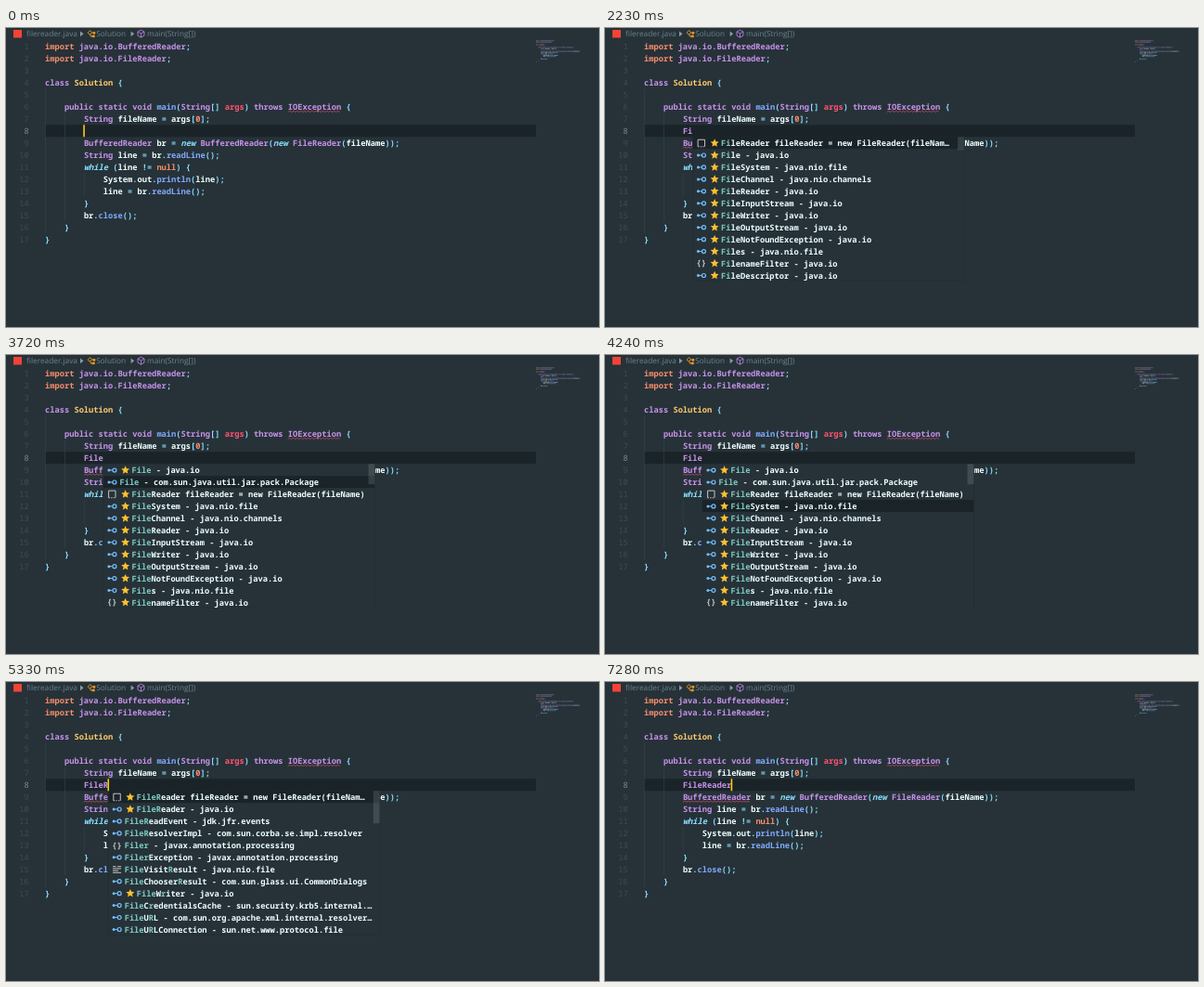
Animation of 639x322 px, one loop 7.51 s. Source, as an HTML page:

```html
<!DOCTYPE html>
<html lang="en">
<head>
<meta charset="utf-8">
<title>Code completion</title>
<style>
  html, body { margin: 0; width: 100%; height: 100%; overflow: hidden; background: #263238; }
  svg { display: block; }
  text {
    font: 600 8.725px "Noto Sans Mono", "DejaVu Sans Mono", monospace;
    white-space: pre;
    text-rendering: geometricPrecision;
  }
  text.crumb { font: 400 8.3px "Open Sans", "Noto Sans", sans-serif; fill: #6d838d; }
  text.num { font-weight: 400; text-anchor: end; }
  text.it { font-style: italic; }
</style>
</head>
<body>
<svg id="stage" width="639" height="322" viewBox="0 0 639 322"></svg>
<script>
const LOOP = 7510;
const CW = 5.235, LH = 12.95, LEFT = 42, TOP = 13.65, BASE = 9.8;
const MAP_X = 571, MAP_Y = 13.4, MAP_CW = 0.65, MAP_LH = 1.41;
const TYPED = 'FileReader';
const POP_W = 292.7;

const COLORS = {
  o: '#f78c6c', p: '#c792ea', c: '#89ddff', i: '#89ddff', y: '#ffcb6b',
  b: '#82aaff', r: '#ff5370', w: '#eeffff'
};

// "~" starts a token, the next letter is its colour
const CODE = [
  '~oimport ~pjava.io.BufferedReader~c;',
  '~oimport ~pjava.io.FileReader~c;',
  '',
  '~pclass ~ySolution ~c{',
  '',
  '~w    ~ppublic static void ~bmain~c(~pString~c[] ~rargs~c) ~pthrows IOException ~c{',
  '~w        ~pString ~wfileName ~c= ~wargs~c[~o0~c];',
  '',
  '~w        ~pBufferedReader ~wbr ~c= ~inew ~pBufferedReader~c(~inew ~pFileReader~c(~wfileName~c));',
  '~w        ~pString ~wline ~c= ~wbr~c.~breadLine~c();',
  '~w        ~iwhile ~c(~wline ~c!= ~onull~c) {',
  '~w            ~wSystem~c.~wout~c.~bprintln~c(~wline~c);',
  '~w            ~wline ~c= ~wbr~c.~breadLine~c();',
  '~w        ~c}',
  '~w        ~wbr~c.~bclose~c();',
  '~w    ~c}',
  '~c}'
];

// kind (s snippet, c class, n interface, e enum), "*" for a starred entry, label
const io = name => 'c*' + name + ' - java.io';
const CUT = 's*FileReader fileReader = new FileReader(fileNam…';
const FILTER = 'n*FilenameFilter - java.io';
const SYSTEM = 'c*FileSystem - java.nio.file';
const CHANNEL = 'c*FileChannel - java.nio.channels';
const COMMON = [
  ...['FileReader', 'FileInputStream', 'FileWriter', 'FileOutputStream', 'FileNotFoundException'].map(io),
  'c*Files - java.nio.file', FILTER
];
const LISTS = {
  first: [CUT, io('File'), io('FileDescriptor'), SYSTEM, ...COMMON, 'c*Float - java.lang'],
  stale: [CUT, io('File'), io('FileDescriptor'), SYSTEM, ...COMMON, CHANNEL],
  sorted: [CUT, io('File'), SYSTEM, CHANNEL, ...COMMON, io('FileDescriptor')],
  file: [io('File'), 'c File - com.sun.java.util.jar.pack.Package',
    's*FileReader fileReader = new FileReader(fileName)', SYSTEM, CHANNEL, ...COMMON],
  reader: [CUT, io('FileReader'), 'c FileReadEvent - jdk.jfr.events',
    'c FileResolverImpl - com.sun.corba.se.impl.resolver',
    'n Filer - javax.annotation.processing',
    'c FilerException - javax.annotation.processing',
    'e FileVisitResult - java.nio.file',
    'c FileChooserResult - com.sun.glass.ui.CommonDialogs',
    io('FileWriter'),
    'c FileCredentialsCache - sun.security.krb5.internal.…',
    'c FileURL - com.sun.org.apache.xml.internal.resolver…',
    'c FileURLConnection - sun.net.www.protocol.file']
};
const THUMB = { first: 14, stale: 14, sorted: 14, file: 22, reader: 35 };

// timelines: [start ms, value]
const CHARS = [[0, 0], [520, 1], [1610, 2], [2610, 3], [2770, 4], [5250, 5], [7280, 10]];
const LIST = [[0, ''], [1070, 'first'], [1690, 'stale'], [2000, 'sorted'], [2920, 'file'], [5330, 'reader'], [7280, '']];
const ANCHOR = [[0, 1], [1690, 2], [2610, 3], [2770, 4], [5330, 5]];
const ROW = [[0, 0], [3720, 1], [3860, 2], [4240, 3], [4410, 4], [4720, 3], [5100, 2], [5330, 0], [6030, 1]];
const CARET = [70, 520, 1140, 1610, 2230, 2610, 3240, 3770, 4240, 4790, 5800, 6350, 6820, 7280];
const ERROR_AT = 1460;

const at = (steps, t) => steps.filter(s => s[0] <= t).pop()[1];
const esc = s => s.replace(/&/g, '&amp;').replace(/</g, '&lt;');
const rect = (x, y, w, h, fill, extra = '') =>
  `<rect x="${x}" y="${y}" width="${w}" height="${h}" fill="${fill}" ${extra}/>`;
const text = (x, y, s, fill, cls = '') =>
  `<text x="${x}" y="${y}" fill="${fill}" class="${cls}">${esc(s)}</text>`;
const path = (d, stroke, w = 1, fill = 'none') =>
  `<path d="${d}" stroke="${stroke}" stroke-width="${w}" fill="${fill}"/>`;
const lineY = i => TOP + i * LH;
const colX = c => LEFT + c * CW;

function squiggle(line, col, len) {
  const y = lineY(line) + 11.5, end = colX(col + len);
  let d = `M${colX(col)} ${y + 0.6}`, up = true;
  for (let x = colX(col) + 2; x < end; x += 2, up = !up) d += `L${x} ${y + (up ? -0.6 : 0.6)}`;
  return path(d, '#d94b66', 0.7);
}

// one bar per word
function mapBars(line, col, s, fill) {
  return [...s.matchAll(/\S+/g)].map(m =>
    rect(MAP_X + (col + m.index) * MAP_CW, MAP_Y + line * MAP_LH, m[0].length * MAP_CW, 0.85, fill, 'opacity=".45"')
  ).join('');
}

function codeLine(src, i) {
  let col = 0, out = '';
  for (const part of src.split('~').slice(1)) {
    const kind = part[0], s = part.slice(1);
    if (s.trim()) {
      out += text(colX(col), lineY(i) + BASE, s, COLORS[kind], kind === 'i' ? 'it' : '');
      out += mapBars(i, col, s, COLORS[kind]);
    }
    col += s.length;
  }
  return out;
}

function lineNumber(_, i) {
  return text(24.8, lineY(i) + BASE, String(i + 1), i === 7 ? '#748c97' : '#3c4c54', 'num');
}

function guide(col, from, to) {
  return rect(colX(col), lineY(from), 0.7, (to - from + 1) * LH, '#37474f', 'opacity=".8"');
}

function breadcrumbs() {
  const arrow = x => path(`M${x} 3.4L${x + 3.6} 6.3L${x} 9.2Z`, 'none', 0, '#8a9ba3');
  return rect(8, 2, 9, 8.5, '#f44336') +
    text(22, 9.3, 'filereader.java', '', 'crumb') + arrow(80) +
    path('M88.2 5.2L90.6 2.6L92.6 4.6L90.2 7.2ZM92.4 5.2H95M91.2 6.6V9H93', '#ee9d28', 0.9) +
    path('M94 4.4h2v1.8h-2zM93 8h2.4v1.8h-2.4z', '#ee9d28', 0.7, '#ee9d28') +
    text(97.3, 9.3, 'Solution', '', 'crumb') + arrow(134.6) +
    path('M145.5 2.2L149 4V8.2L145.5 10.2L142 8.2V4ZM142 4L145.5 6L149 4M145.5 6V10.2', '#b180d7', 0.9) +
    text(152, 9.3, 'main(String[])', '', 'crumb');
}

function star(cx, cy) {
  let d = '';
  for (let k = 0; k < 10; k++) {
    const r = k % 2 ? 2.2 : 4.7, a = (k * 36 - 90) * Math.PI / 180;
    d += `${k ? 'L' : 'M'}${cx + r * Math.cos(a)} ${cy + r * Math.sin(a)}`;
  }
  return path(d + 'Z', 'none', 0, '#ffc02e');
}

function icon(kind, x, y) {
  if (kind === 's') {
    return path(`M${x - 3.7} ${y + 3.8}V${y - 3.8}H${x + 3.7}V${y + 3.8}`, '#c5c5c5') +
      path(`M${x - 3.7} ${y + 3.8}h1.4m1.2 0h1.4m1.2 0h1.4`, '#c5c5c5');
  }
  if (kind === 'n') return text(x - CW, y + 2.9, '{}', '#c5c5c5');
  if (kind === 'e') {
    return path(`M${x - 4.5} ${y - 3}h3.5m1.5 0h4M${x - 4.5} ${y - 0.8}h9M${x - 4.5} ${y + 1.4}h6M${x - 4.5} ${y + 3.6}h9`, '#c5c5c5');
  }
  return `<circle cx="${x - 3.4}" cy="${y}" r="1.5" fill="#75beff"/>` +
    path(`M${x - 2.5} ${y}H${x + 0.6}`, '#75beff') +
    `<circle cx="${x + 2.6}" cy="${y}" r="2" fill="none" stroke="#75beff" stroke-width="1.2"/>`;
}

function label(x, y, s, n) {
  const head = Math.min(n, 4);
  const hit = n < 5 ? -1 : s.indexOf('R', 4) > 0 ? s.indexOf('R', 4) : s.indexOf('r', 4);
  const spans = [...s].map((ch, k) => k < head && ch === TYPED[k] || k === hit
    ? `<tspan fill="#80cbc4">${ch}</tspan>` : esc(ch)).join('');
  return `<text x="${x}" y="${y}" fill="#eeffff">${spans}</text>`;
}

function popup(name, n, row) {
  const x = colX(8 + n), top = lineY(8), list = LISTS[name], h = list.length * LH;
  let out = rect(x, top, POP_W, h, '#263238', 'stroke="#222d33" stroke-width=".7"');
  out += rect(x + 0.4, top + row * LH, POP_W - 0.8, LH, '#1a2328');
  list.forEach((item, k) => {
    const y = top + k * LH, mid = y + LH / 2 + 0.3, starred = item[1] === '*';
    out += icon(item[0], x + 9.5, mid);
    if (starred) out += star(x + 23.8, mid);
    out += label(x + (starred ? 30.7 : 17.6), y + BASE, item.slice(2), n);
  });
  return out + rect(x + POP_W - 7, top, 6.8, THUMB[name], '#ffffff', 'opacity=".12"');
}

const stage = document.getElementById('stage');
stage.innerHTML =
  rect(LEFT, lineY(7), MAP_X - LEFT, LH, '#1a2328') +
  guide(0, 4, 15) + guide(4, 6, 14) + guide(8, 11, 12) +
  breadcrumbs() + CODE.map(lineNumber).join('') + CODE.map(codeLine).join('') +
  squiggle(5, 50, 11) + '<g id="live"></g>';
const live = document.getElementById('live');
let shown = '';

function draw() {
  const t = performance.now() % LOOP;
  const n = at(CHARS, t), list = at(LIST, t), anchor = at(ANCHOR, t), row = at(ROW, t);
  const caret = CARET.filter(s => s <= t).length % 2 === 0;
  const error = t >= ERROR_AT;
  const key = [n, list, anchor, row, caret, error].join();
  if (key !== shown) {
    shown = key;
    const typed = TYPED.slice(0, n);
    live.innerHTML =
      (n ? text(colX(8), lineY(7) + BASE, typed, COLORS.p) + mapBars(7, 8, typed, COLORS.p) : '') +
      (error ? squiggle(8, 8, 14) : '') +
      (list ? popup(list, anchor, row) : '') +
      (caret ? rect(colX(8 + n) - 0.6, lineY(7), 1.6, LH, '#ffcc00') : '');
  }
  requestAnimationFrame(draw);
}
draw();
</script>
</body>
</html>
```
